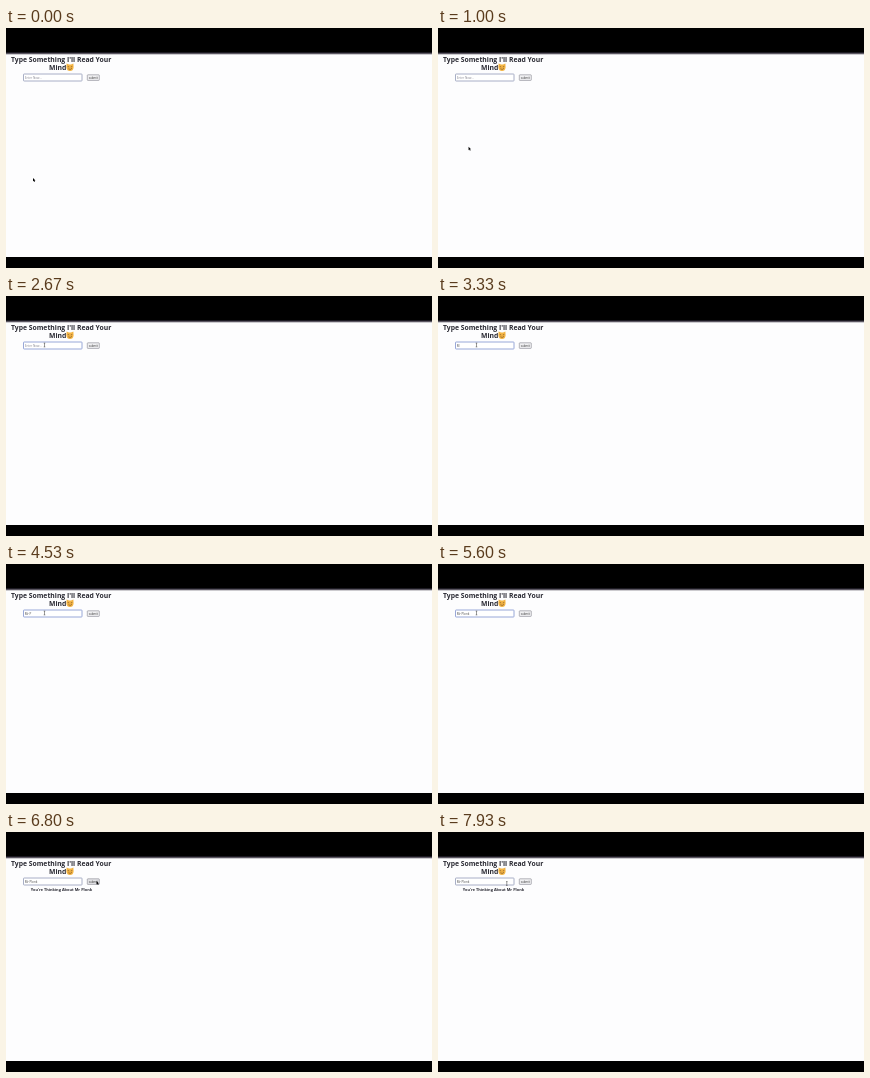
These frames come from a looping animation (426x240 px, 8 s). An HTML page:

```html
<!DOCTYPE html>
<html lang="en">
<head>
<meta charset="utf-8">
<title>Mind reader</title>
<style>
  html, body { margin: 0; width: 100%; height: 100%; overflow: hidden; background: #000; }
  svg { display: block; width: 100%; height: 100%; }
  text { font-family: "Open Sans", "Noto Sans", sans-serif; }
  .bold { font-weight: 700; fill: #2a2a33; }
</style>
</head>
<body>
<svg viewBox="0 0 426 240">
  <rect width="426" height="240" fill="#000"/>
  <rect y="24" width="426" height="3" fill="#5b5661"/>
  <rect y="24" width="426" height="1" fill="#1c1a22"/>
  <rect y="26.3" width="426" height="202.7" fill="#fdfdfe"/>

  <text class="bold" x="5" y="33.6" font-size="6.8" id="title">Type Something I'll Read Your</text>
  <text class="bold" x="43" y="42" font-size="6.8">Mind</text>
  <g id="cat">
    <path d="M60.4 39.5 L60.6 35.6 L63 36.6 H65 L67.4 35.6 L67.6 39.5 Q67.2 43 64 43 Q60.8 43 60.4 39.5Z" fill="#f4b544"/>
    <path d="M61.7 38.4 l1.5 .6 M66.3 38.4 l-1.5 .6 M62.3 40.8 Q64.4 42.2 66 40.4" fill="none" stroke="#6b4423" stroke-width=".6"/>
  </g>

  <rect id="field" x="17.5" y="46" width="58.5" height="7" rx=".6" fill="#fff" stroke-width=".8"/>
  <text id="value" x="18.8" y="50.6" font-size="3"></text>
  <rect id="button" x="81.3" y="46.8" width="12" height="5.6" rx=".6" stroke="#85858f" stroke-width=".6"/>
  <text x="87.3" y="50.6" font-size="2.8" text-anchor="middle" fill="#333">submit</text>
  <text id="answer" class="bold" x="55.5" y="59.3" font-size="3.9" text-anchor="middle"></text>

  <g id="pointer">
    <path id="arrow" d="M0 0 V3.4 L.8 2.7 L1.4 3.9 L2 3.6 L1.5 2.5 H2.5Z" fill="#000"/>
    <path id="beam" d="M-.8 -1.9 H.8 M0 -1.9 V1.9 M-.8 1.9 H.8" stroke="#333" stroke-width=".5"/>
  </g>
</svg>
<script>
const LOOP = 8000;
const NAME = "Mr Plonk";
const KEYS = [3000, 3650, 4050, 4400, 4700, 4930, 5150, 5400];
const CLICK = 6470;

// time, x, y
const PATH = [
  [0, 27, 150], [650, 27, 150], [1600, 38.5, 49], [5680, 38.5, 49],
  [6350, 90.5, 49], [7050, 90.5, 49], [7700, 68.8, 51.5], [LOOP, 68.8, 51.5]
];

const $ = id => document.getElementById(id);
const ease = u => u * u * (3 - 2 * u);
const show = (id, on) => $(id).setAttribute("visibility", on ? "visible" : "hidden");

function pointerAt(t) {
  const i = PATH.findIndex(p => p[0] > t);
  const [t0, x0, y0] = PATH[i - 1], [t1, x1, y1] = PATH[i];
  const u = ease((t - t0) / (t1 - t0));
  return [x0 + (x1 - x0) * u, y0 + (y1 - y0) * u];
}

function draw(t) {
  const [x, y] = pointerAt(t);
  const overField = x > 17.5 && x < 76 && y > 46 && y < 53;
  const overButton = x > 81.3 && x < 93.3 && y > 46.8 && y < 52.4;
  $("pointer").setAttribute("transform", `translate(${x} ${y})`);
  show("arrow", !overField);
  show("beam", overField);

  const typed = NAME.slice(0, KEYS.filter(k => k <= t).length);
  $("value").textContent = typed || "Enter Now...";
  $("value").setAttribute("fill", typed ? "#444" : "#8a8a94");
  const focused = t > 1800 && t < CLICK;
  $("field").setAttribute("stroke", focused ? "#7f92cf" : "#929bb8");
  $("button").setAttribute("fill", overButton ? "#e3e3e6" : "#f0f0f2");
  $("answer").textContent = t >= CLICK ? "You're Thinking About " + NAME : "";
}

function tick() {
  draw(performance.now() % LOOP);
  requestAnimationFrame(tick);
}
tick();
</script>
</body>
</html>
```
